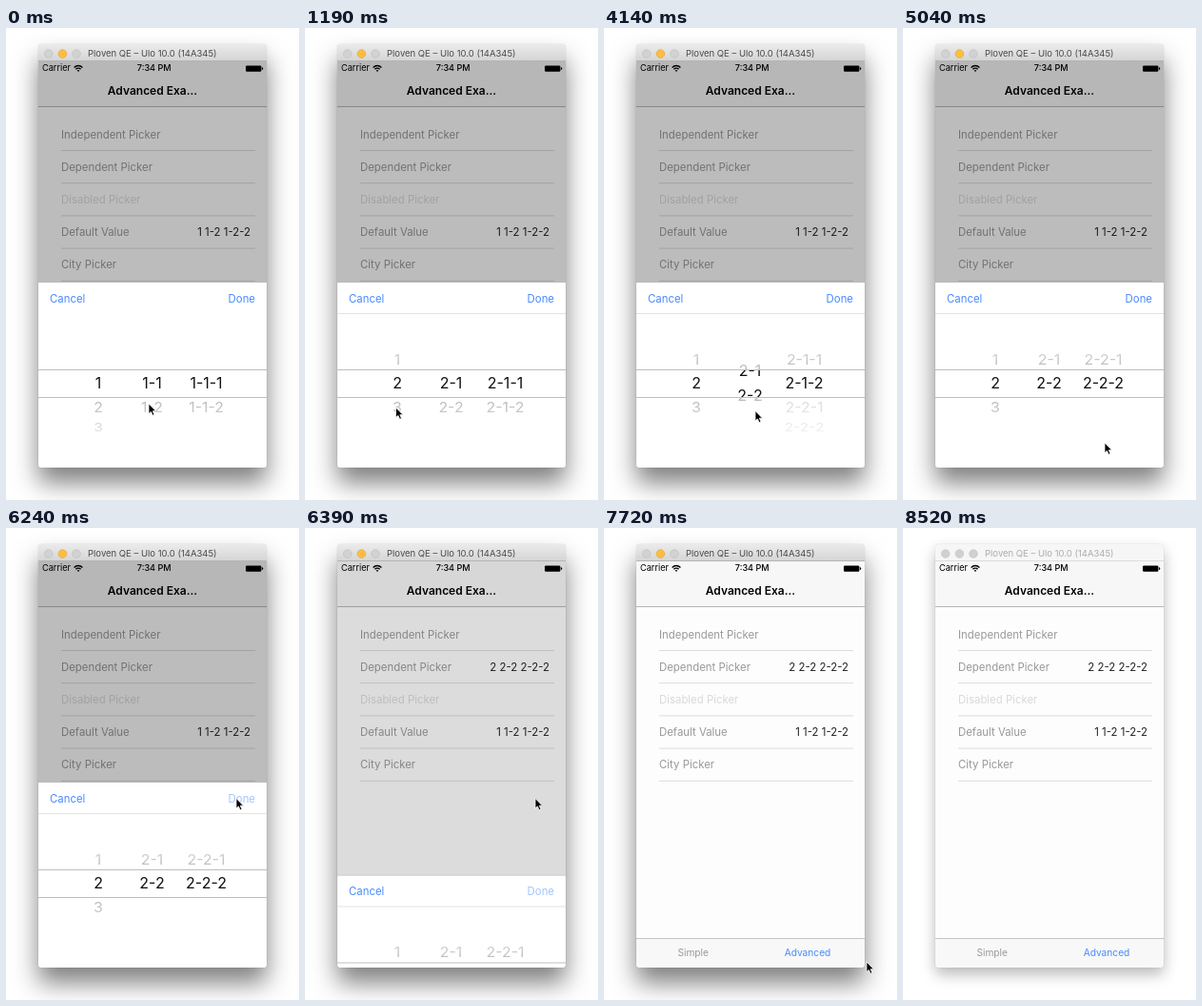
These frames come from a looping animation (308x495 px, 8.62 s). An HTML page:

```html
<!DOCTYPE html>
<html lang="en">
<head>
<meta charset="utf-8">
<title>Dependent picker</title>
<style>
  html, body { margin: 0; width: 100%; height: 100%; overflow: hidden; background: #fff; }
  #shadow {
    position: absolute; left: 34px; top: 17px; width: 240px; height: 444px; border-radius: 4px;
    box-shadow: 0 16px 26px rgba(0,0,0,.5), 0 0 1px rgba(0,0,0,.35);
  }
  svg { position: absolute; left: 0; top: 0; display: block; }
  text { font-family: Inter, Roboto, "Liberation Sans", sans-serif; font-size: 11.4px; }
  .mid { text-anchor: middle; }
  .end { text-anchor: end; }
  .blue { fill: #488aff; }
  .label { fill: #999; }
  .off { fill: #d9d9d9; }
  .value { fill: #222; }
  .tab { font-size: 10.2px; }
  .opt { font-size: 16px; text-anchor: middle; fill: #111; }
  #caption { font-size: 9.5px; fill: #4a4a4a; }
  #bar { fill: url(#barFill); }
  #barLine { stroke: #b4b4b4; }
  .light { fill: #d2d2d2; stroke: #bdbdbd; stroke-width: .6; }
  .amber { fill: #fdbe40; stroke: #dfa032; }
  .idle #shadow { box-shadow: 0 7px 15px rgba(0,0,0,.28), 0 0 1px rgba(0,0,0,.3); }
  .idle #caption { fill: #acacac; }
  .idle #bar { fill: #f6f6f6; }
  .idle #barLine { stroke: #dcdcdc; }
  .idle .light { fill: #d0d0d0; stroke: #c2c2c2; }
</style>
</head>
<body>
<div id="shadow"></div>
<svg width="308" height="495" viewBox="0 0 308 495">
  <defs>
    <linearGradient id="barFill" x2="0" y2="1">
      <stop stop-color="#ebebeb"/><stop offset="1" stop-color="#d4d4d4"/>
    </linearGradient>
    <linearGradient id="fadeTop" x2="0" y2="1">
      <stop offset=".2" stop-color="#fff"/><stop offset="1" stop-color="#fff" stop-opacity=".7"/>
    </linearGradient>
    <linearGradient id="fadeLow" x2="0" y2="1">
      <stop stop-color="#fff" stop-opacity=".7"/><stop offset=".85" stop-color="#fff"/>
    </linearGradient>
    <clipPath id="frame"><rect x="34" y="17" width="240" height="444" rx="4"/></clipPath>
  </defs>

  <g clip-path="url(#frame)">
    <rect x="34" y="34" width="240" height="427" fill="#fdfdfd"/>
    <rect x="34" y="35" width="240" height="47" fill="#f7f7f7"/>
    <path d="M34 82.5H274" stroke="#b6b6b6"/>

    <text x="38" y="45.4" style="font-size:9.2px">Carrier</text>
    <g fill="none" stroke="#000" stroke-width="1.4">
      <path d="M71.6 41.4a6.2 6.2 0 0 1 8.8 0M73.4 43.3a3.7 3.7 0 0 1 5.2 0"/>
    </g>
    <path d="M74.7 44.6a1.9 1.9 0 0 1 2.6 0L76 46Z"/>
    <text class="mid" x="155.7" y="45.4" style="font-size:9.1px;font-weight:500">7:34 PM</text>
    <rect x="252" y="39.4" width="16.4" height="6.4" rx="1.2"/>
    <path d="M269 41.2q1.3 0 1.3 1.4t-1.3 1.4Z"/>
    <text class="mid" x="154" y="70.2" style="font-size:12px;font-weight:600">Advanced Exa...</text>

    <g id="rows"></g>
    <text id="picked" class="value end" x="257" y="150">2 2-2 2-2-2</text>
    <text class="value end" x="257" y="218">1 1-2 1-2-2</text>

    <rect x="34" y="430" width="240" height="31" fill="#f8f8f8"/>
    <path d="M34 430.5H274" stroke="#c4c4c4"/>
    <text class="label tab mid" x="93.7" y="449.3">Simple</text>
    <text class="blue tab mid" x="214" y="449.3">Advanced</text>

    <rect id="dim" x="34" y="35" width="240" height="426"/>

    <g id="sheet">
      <rect x="34" y="266" width="240" height="196" fill="#fff"/>
      <path d="M34 266.5H274" stroke="#bcbcbc"/>
      <g id="wheel"></g>
      <rect x="34" y="300" width="240" height="58" fill="url(#fadeTop)"/>
      <rect x="34" y="388" width="240" height="74" fill="url(#fadeLow)"/>
      <path d="M34 358.5H274M34 387.5H274" stroke="#bebebe"/>
      <path id="rule" d="M34 299.5H274" stroke="#dfe2e8"/>
      <text class="blue" x="46" y="287.7">Cancel</text>
      <text id="done" class="blue end" x="262" y="287.7">Done</text>
    </g>

    <rect id="bar" x="34" y="17" width="240" height="18"/>
    <path id="barLine" d="M34 34.5H274"/>
    <circle class="light" cx="44.7" cy="27" r="4.3"/>
    <circle class="light amber" cx="59.4" cy="27" r="4.3"/>
    <circle class="light" cx="74" cy="27" r="4.3"/>
    <text id="caption" x="86" y="30.3">Ploven QE – Ulo 10.0 (14A345)</text>
  </g>

  <path id="cursor" d="M0 0V10.6L2.4 8.4L4.1 12.3L6 11.5L4.3 7.7H7.6Z" stroke="#fff" stroke-width=".8"/>
</svg>

<script>
const LOOP = 8620, STEP = 148.3, LAG = 20, IDLE_AT = 8520;
const $ = id => document.getElementById(id);

function add(parent, tag, attrs, text = '') {
  const el = document.createElementNS('http://www.w3.org/2000/svg', tag);
  for (const name in attrs) el.setAttribute(name, attrs[name]);
  el.textContent = text;
  parent.append(el);
  return el;
}

['Independent', 'Dependent', 'Disabled', 'Default Value', 'City'].forEach((name, i) => {
  const label = i === 3 ? name : name + ' Picker';
  add($('rows'), 'text', { class: i === 2 ? 'off' : 'label', x: 58, y: 116 + 34 * i }, label);
  add($('rows'), 'path', { d: `M58 ${128.5 + 34.2 * i}H262`, stroke: '#dcdce0' });
});

// Each column lists every option; those outside the chosen parent are hidden.
const firsts = ['1', '2', '3'];
const seconds = ['1-1', '1-2', '2-1', '2-2', '3-1'];
const thirds = seconds.flatMap(s => [s + '-1', s + '-2']);
const columns = [[97, firsts], [153.5, seconds], [210.5, thirds]].map(([x, names]) => ({
  x, names, els: names.map(n => add($('wheel'), 'text', { class: 'opt' }, n))
}));

// Keys are [step, ...values].
const picks = [
  [0, 0, 0, 0], [6, 0, 0, 0], [8, 1, 2, 4], [11, 1, 2, 4], [13, 2, 4, 8],
  [20, 2, 4, 8], [22, 1, 2, 4], [27, 1, 2, 4], [29, 1, 3, 6], [32, 1, 3, 6], [34, 1, 3, 7]
];
const moves = [
  [0, 150, 394], [2, 136, 393], [5, 97, 397], [8, 95.5, 398], [9, 95.5, 398],
  [11, 95, 398], [14, 88, 390], [17, 92, 370], [19, 94, 361], [20, 94, 348], [22, 95, 346],
  [25, 148, 398], [27, 159, 401.5], [28, 159, 401.5], [30, 205, 400], [31, 205, 400],
  [33, 207, 402], [34, 212, 435], [36, 230, 340], [38, 241, 285], [40, 242, 283.5],
  [43, 242, 283.5], [46, 241.5, 283], [48, 241.5, 283], [50, 248, 330], [52, 276, 455], [53, 281, 500]
];
const closing = [[0, 0], [42, 0], [43, .5], [44, .94], [45, 1]];

function between(keys, k) {
  let i = keys.findIndex(key => key[0] > k);
  if (i < 0) i = keys.length;
  const a = keys[i - 1], b = keys[i] || a;
  return { a, b, p: b === a ? 0 : (k - a[0]) / (b[0] - a[0]) };
}

function sample(keys, k) {
  const { a, b, p } = between(keys, k);
  return a.slice(1).map((v, i) => v + (b[i + 1] - v) * p);
}

function enabled(key, col, name) {
  return col === 0 || name.startsWith(columns[col - 1].names[key[col]] + '-') ? 1 : 0;
}

function drawWheel(k) {
  const { a, b, p } = between(picks, k);
  columns.forEach(({ x, names, els }, c) => {
    const at = a[c + 1] + (b[c + 1] - a[c + 1]) * p;
    els.forEach((el, i) => {
      const turn = i - at;
      const angle = turn * 20.7 * Math.PI / 180;
      const near = 1 / (1 - .09 * Math.cos(angle));
      const y = 372.3 + 64.8 * Math.sin(angle) * near;
      const size = near * .91;
      const old = enabled(a, c, names[i]) * Math.min(1, 2 - 2 * p);
      const fresh = enabled(b, c, names[i]) * p;
      el.setAttribute('transform',
        `translate(${x} ${y}) scale(${size} ${size * Math.cos(angle)}) translate(0 5.8)`);
      el.setAttribute('opacity', Math.abs(turn) < 3.2 ? Math.min(1, old + fresh) : 0);
    });
  });
}

function draw() {
  const t = performance.now() % LOOP;
  const k = Math.floor((t + LAG) / STEP);
  const [x, y] = sample(moves, k);
  const [shut] = sample(closing, k);

  drawWheel(k);
  $('cursor').setAttribute('transform', `translate(${x} ${y})`);
  $('sheet').setAttribute('transform', `translate(0 ${shut * 195})`);
  $('sheet').style.display = shut < 1 ? '' : 'none';
  $('dim').setAttribute('opacity', .26 * (1 - shut));
  $('rule').setAttribute('opacity', k < 1 ? 0 : 1);
  $('done').setAttribute('opacity', k >= 41 ? .5 : 1);
  $('picked').setAttribute('opacity', k >= 43 ? 1 : 0);
  document.body.className = t >= IDLE_AT ? 'idle' : '';
  requestAnimationFrame(draw);
}
draw();
</script>
</body>
</html>
```
